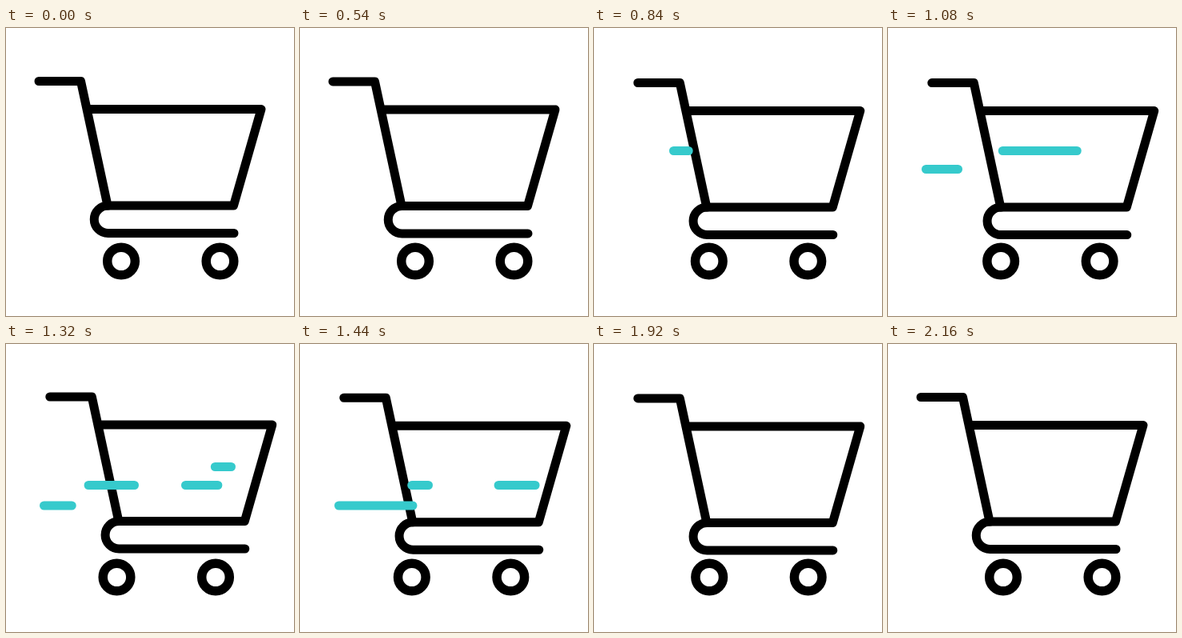
These frames come from a looping animation (360x360 px, 2700 ms). An HTML page:

```html
<!DOCTYPE html>
<html lang="en">
<head>
<meta charset="utf-8">
<title>Shopping cart</title>
<style>
  html, body { margin: 0; width: 100%; height: 100%; overflow: hidden; background: #fff; }
  svg { display: block; width: 100%; height: 100%; }
</style>
</head>
<body>
<svg viewBox="0 0 360 360" fill="none" stroke="#000" stroke-width="11" stroke-linecap="round" stroke-linejoin="round">
  <g id="cart">
    <path d="M41 66.5H93.5L127 222H284.5L319 101.5H102"/>
    <path d="M127.5 222a17.25 17.25 0 0 0 0 34.5H285"/>
  </g>
  <g id="wheels" stroke-width="11.5">
    <circle cx="144" cy="291.5" r="17.3"/>
    <circle cx="267.5" cy="291.5" r="17.3"/>
  </g>
  <g id="streaks" stroke="#36cacc"></g>
</svg>
<script>
const LOOP = 2700, GROW = 370, LAG = 189;
const cart = document.getElementById('cart');
const wheels = document.getElementById('wheels');
const group = document.getElementById('streaks');

// Keyframes as [time, value]
const cartX = [[540, 0], [780, 13.8], [1930, 13.8], [2160, 0]];
const cartY = [[510, 0], [540, 0.4], [690, -0.5], [840, 2], [960, 3], [1320, -0.5],
  [1620, 3], [1800, -0.5], [1920, 1.4], [2010, 2], [2160, 0]];
const wheelX = [[540, 0], [840, -0.2], [1320, -5.5], [1620, -1.8], [1920, 0.2], [2160, 0]];

// Each streak grows from its left end, then shrinks towards its right end
const streaks = [
  { y: 153.5, from: 99.5, to: 281.5, start: 803 },
  { y: 176.5, from: 47.5, to: 160.5, start: 950 },
  { y: 176.5, from: 224.5, to: 314.5, start: 1155 },
  { y: 202, from: 47.5, to: 228.5, start: 1250 }
];
for (const s of streaks) {
  s.path = document.createElementNS('http://www.w3.org/2000/svg', 'path');
  group.append(s.path);
}

const clamp = v => Math.max(0, Math.min(1, v));

function at(keys, t) {
  const i = keys.findIndex(k => k[0] > t);
  if (i < 0) return keys[keys.length - 1][1];
  if (i === 0) return keys[0][1];
  const [t0, a] = keys[i - 1], [t1, b] = keys[i];
  const p = (t - t0) / (t1 - t0);
  return a + (b - a) * p * p * (3 - 2 * p);
}

function draw(t) {
  cart.setAttribute('transform', `translate(${at(cartX, t)} ${at(cartY, t)})`);
  wheels.setAttribute('transform', `translate(${at(wheelX, t)} 0)`);
  for (const { path, y, from, to, start } of streaks) {
    const head = clamp((t - start) / GROW);
    const tail = clamp((t - start - LAG) / GROW);
    const x = p => from + (to - from) * p;
    path.setAttribute('d', head > tail ? `M${x(tail)} ${y}H${x(head)}` : '');
  }
}

const begin = performance.now();
function tick() {
  draw((performance.now() - begin) % LOOP);
  requestAnimationFrame(tick);
}
tick();
</script>
</body>
</html>
```
